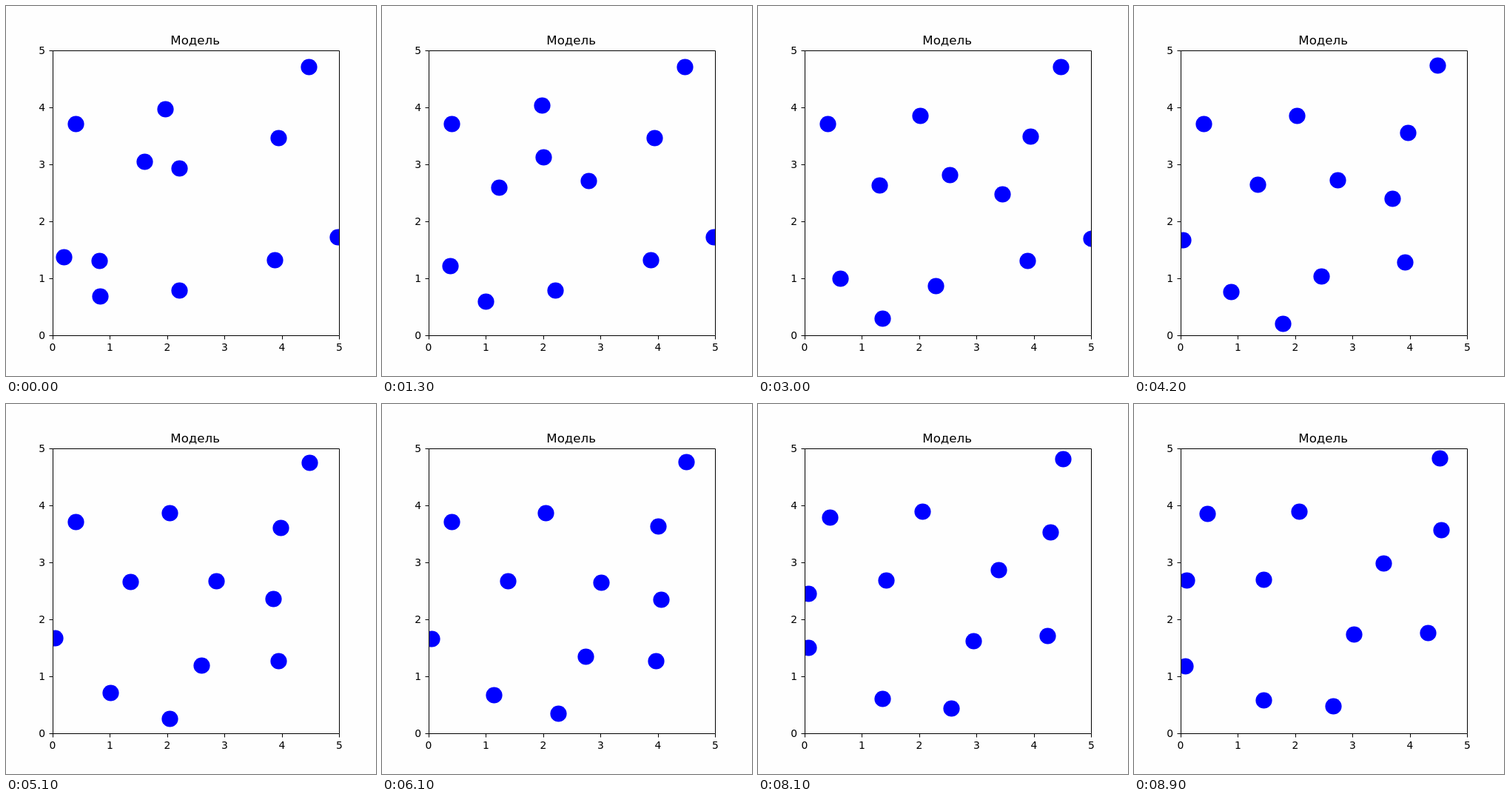
These frames come from a looping animation (500 by 500 pixels, 9000 ms). An HTML page:

```html
<!DOCTYPE html>
<html lang="ru">
<head>
<meta charset="utf-8">
<style>
  html, body { margin: 0; width: 100%; height: 100%; overflow: hidden; background: #fefefe; }
  svg { display: block; width: 500px; height: 500px; font: 13.89px "DejaVu Sans", sans-serif; }
  .axes { fill: none; stroke: #000; stroke-width: 1; }
</style>
</head>
<body>
<svg id="stage" viewBox="0 0 500 500">
  <defs><clipPath id="box"><rect x="63" y="60" width="387" height="385"/></clipPath></defs>
  <g id="balls" fill="#00f" clip-path="url(#box)"></g>
  <path id="frame" class="axes"/>
  <g id="labels"></g>
  <text x="255.7" y="52" font-size="16.67" text-anchor="middle">Модель</text>
</svg>
<script>
const LOOP = 9000, STEP = 100, RIGHT = 450, SPAN = 387;
const balls = [];

function add(parent, tag, attrs, text = '') {
  const node = document.createElementNS('http://www.w3.org/2000/svg', tag);
  for (const key in attrs) node.setAttribute(key, attrs[key]);
  node.textContent = text;
  return document.getElementById(parent).appendChild(node);
}

function drawAxes() {
  let d = 'M63.5 60.5H450.5V445.5H63.5Z';
  for (let i = 0; i <= 5; i++) {
    const x = Math.round(62.6 + i * 77.5) + 0.5, y = 445.5 - i * 77;
    d += `M${x} 445.5v5M63.5 ${y}h-5`;
    add('labels', 'text', { x: 63 + i * 77.5, y: 466, 'text-anchor': 'middle' }, i);
    add('labels', 'text', { x: 53, y: y + 4.5, 'text-anchor': 'end' }, i);
  }
  document.getElementById('frame').setAttribute('d', d);
}

// A ball rests until its first turning point [step, x, y], then glides through the others.
function ball(...path) {
  balls.push({ path, node: add('balls', 'circle', { r: 11.1 }) });
}

function slope(path, i, axis) {
  const secant = k => (path[k + 1][axis] - path[k][axis]) / (path[k + 1][0] - path[k][0]);
  if (i === 0) return path[0][0] ? 0 : secant(0);
  if (i === path.length - 1) return secant(i - 1);
  const a = secant(i - 1), b = secant(i);
  return a * b <= 0 ? 0 : 2 * a * b / (a + b);
}

// Monotone cubic interpolation.
function at(path, step, axis) {
  if (step <= path[0][0]) return path[0][axis];
  let i = 0;
  while (i < path.length - 2 && step > path[i + 1][0]) i++;
  const p = path[i], q = path[i + 1], h = q[0] - p[0];
  const u = (step - p[0]) / h, v = 1 - u;
  return v * v * (1 + 2 * u) * p[axis] + u * u * (1 + 2 * v) * q[axis]
    + h * u * v * (v * slope(path, i, axis) - u * slope(path, i + 1, axis));
}

// Past the right wall a ball re-enters on the left.
function render(time) {
  const step = Math.floor((time % LOOP) / STEP);
  for (const { path, node } of balls) {
    const x = Math.round(at(path, step, 1)), y = Math.round(at(path, step, 2));
    node.setAttribute('cx', (x > RIGHT ? x - SPAN : x) + 0.5);
    node.setAttribute('cy', y + 0.5);
  }
}

drawAxes();
ball([66, 94, 159], [89, 99, 148]);
ball([0, 215, 139], [17, 217, 133], [30, 219, 148], [89, 223, 145]);
ball([0, 187, 210], [13, 218, 204], [30, 259, 228], [61, 296, 241], [89, 337, 215]);
ball([0, 234, 219], [30, 330, 254], [61, 377, 264], [73, 410, 248], [80, 454, 256], [89, 458, 238]);
ball([20, 368, 178], [61, 373, 165], [73, 380, 175], [89, 415, 170]);
ball([20, 409, 82], [89, 413, 73]);
ball([20, 448, 312], [42, 453, 316], [74, 454, 317], [89, 456, 354]);
ball([13, 363, 343], [61, 370, 347], [73, 385, 318], [89, 397, 309]);
ball([18, 234, 384], [61, 275, 341], [89, 297, 311]);
ball([0, 127, 392], [13, 140, 399], [30, 168, 422], [42, 201, 429], [61, 238, 418], [89, 269, 408]);
ball([0, 126, 344], [13, 158, 245], [89, 175, 237]);
ball([0, 78, 339], [30, 111, 368], [42, 131, 386], [89, 175, 400]);

const start = performance.now();
function tick() {
  render(performance.now() - start);
  requestAnimationFrame(tick);
}
tick();
</script>
</body>
</html>
```
